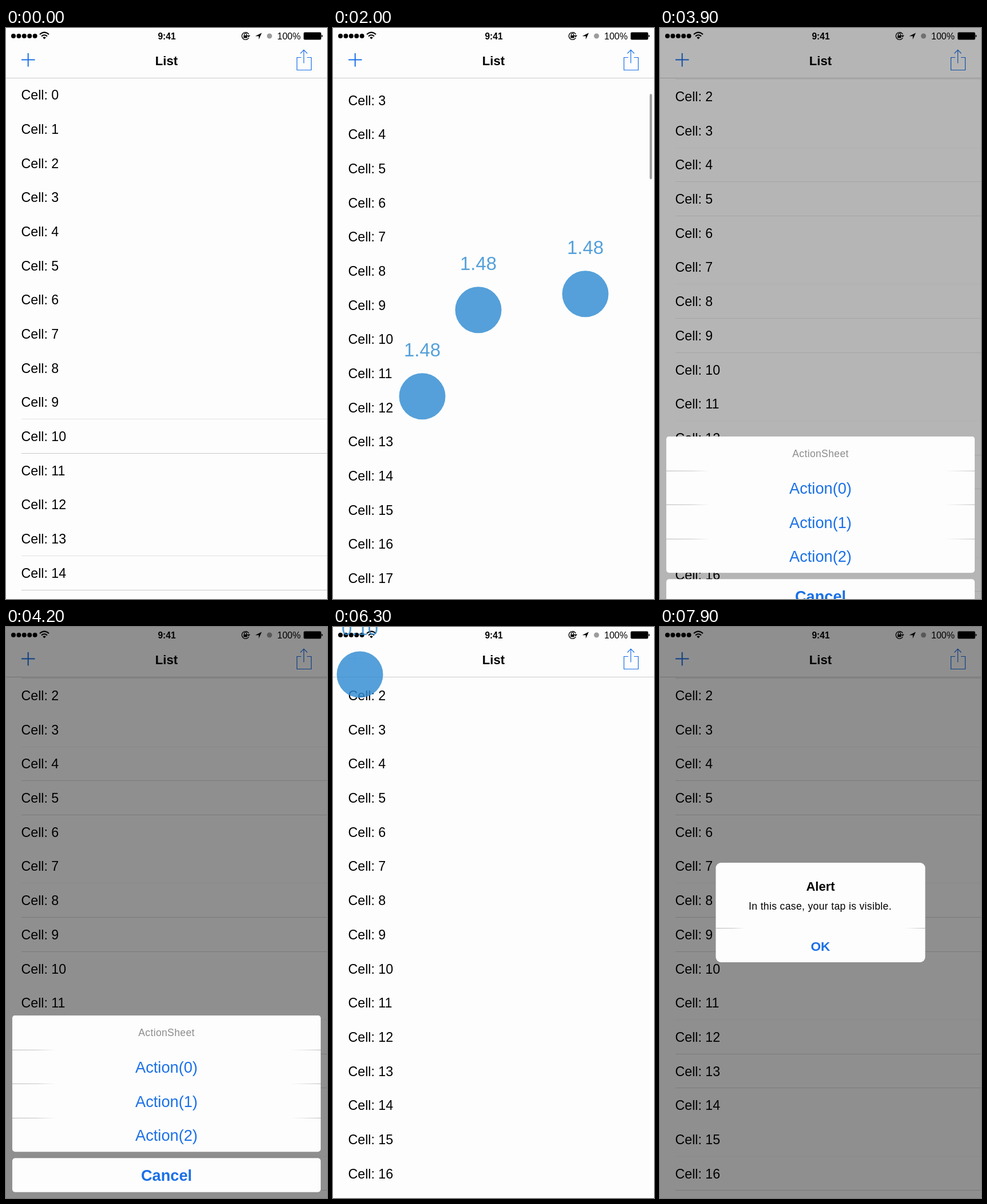
These frames come from a looping animation (561 by 998 pixels, 8 s). An HTML page:

```html
<!DOCTYPE html>
<html lang="en">
<head>
<meta charset="utf-8">
<title>List</title>
<style>
@property --y { syntax: "<number>"; inherits: true; initial-value: 0; }
@property --dim { syntax: "<number>"; inherits: true; initial-value: 0; }
html, body { margin: 0; width: 100%; height: 100%; overflow: hidden; background: #fdfdfd; }
svg {
  display: block; width: 561px; height: 998px;
  font-family: "Liberation Sans", Arial, sans-serif;
  animation: scroll 8s infinite, dim 8s infinite linear;
}
.bold { font-weight: bold; }
.mid { text-anchor: middle; }
.blue { fill: #1a70e8; }
.line { fill: none; stroke: #1a70e8; }
.row { font-size: 23.2px; }
.panel { fill: #fdfdfd; }
.crisp { shape-rendering: crispEdges; }
.action { font-size: 27.2px; }
.small { font-size: 17.6px; letter-spacing: .33px; }
.touch { fill: #308cd2; opacity: 0; font-size: 32.8px; text-anchor: middle; }
.scrolled { transform: translateY(calc(var(--y) * -1px)); }
#bar { transform: translateY(calc(var(--y) * .149px)); animation: bar 8s infinite linear; }
#shade { opacity: calc(var(--dim) * .435); }
#lines { opacity: var(--dim); }
#rest { animation: rest 8s infinite step-end; }
#sheet { animation: sheet 8s infinite; }
#alert { transform-origin: 280.5px 499px; animation: alert 8s infinite; }
#plus { animation: plus 8s infinite step-end; }
#share { animation: share 8s infinite step-end; }

@keyframes scroll {
  0%, 6.5% { --y: 0; animation-timing-function: cubic-bezier(.35, .1, .5, .9); }
  15% { --y: 255.5; animation-timing-function: ease-out; }
  18% { --y: 272; animation-timing-function: cubic-bezier(.45, 0, .6, .9); }
  28% { --y: 136; animation-timing-function: ease-out; }
  33%, 100% { --y: 116.5; }
}
@keyframes dim {
  0%, 45.6% { --dim: 0; }
  50.5%, 70.6% { --dim: 1; }
  75.5%, 80.5% { --dim: 0; }
  85%, 100% { --dim: 1; }
}
@keyframes bar {
  0%, 6.5% { opacity: 0; }
  7%, 33.5% { opacity: 1; }
  37%, 100% { opacity: 0; }
}
@keyframes rest {
  0% { opacity: 1; }
  6.25%, 100% { opacity: 0; }
}
@keyframes sheet {
  0%, 45.6% { transform: translateY(335px); animation-timing-function: cubic-bezier(.1, .8, .3, 1); }
  53.5%, 70.6% { transform: none; animation-timing-function: cubic-bezier(.4, .1, .5, 1); }
  75.6%, 100% { transform: translateY(335px); }
}
@keyframes alert {
  0%, 80.5% { opacity: 0; transform: scale(1.2); animation-timing-function: cubic-bezier(.15, .8, .3, 1); }
  86%, 100% { opacity: 1; transform: none; }
}
@keyframes plus {
  0% { opacity: 1; }
  77.5% { opacity: .1; }
  80.5%, 100% { opacity: 1; }
}
@keyframes share {
  0% { opacity: 1; }
  43.75% { opacity: .2; }
  45.6%, 100% { opacity: 1; }
}
</style>
</head>
<body>
<svg viewBox="0 0 561 998" xmlns="http://www.w3.org/2000/svg">
  <defs>
    <linearGradient id="ends">
      <stop offset="0" stop-color="#b4b4b4"/>
      <stop offset=".08" stop-color="#c4c4c4"/>
      <stop offset=".14" stop-color="#c4c4c4" stop-opacity="0"/>
      <stop offset=".9" stop-color="#c4c4c4" stop-opacity="0"/>
      <stop offset="1" stop-color="#b4b4b4"/>
    </linearGradient>
  </defs>
  <rect width="561" height="998" fill="#fdfdfd"/>

  <g class="scrolled">
    <g id="rest" class="crisp"></g>
    <g id="lines" class="crisp"></g>
    <g id="rows" class="row"></g>
  </g>
  <rect id="bar" x="553.5" y="90" width="4" height="149" rx="2" fill="#9a9a9a"/>

  <rect width="561" height="87" fill="#fdfdfd"/>
  <rect y="87" width="561" height="1" fill="#cbcbcb"/>
  <g id="dots"></g>
  <g fill="none" stroke="#000" stroke-width="2">
    <path d="M59 11.2Q67 4 75 11.2M62 14.4Q67 10 72 14.4"/>
    <path d="M67 19.6L64.2 16.7Q67 14.4 69.8 16.7Z" fill="#000" stroke="none"/>
    <path d="M424.3 11A6.4 6.4 0 1 0 424.3 17" stroke-width="1.4"/>
    <path d="M421 12.8h6l-3 3.4z" fill="#000" stroke="none"/>
    <path d="M416.4 13v-1.6a2 2 0 0 1 4 0V13" stroke-width="1.2"/>
    <path d="M415.2 13h6.4v4.6h-6.4zM447 8.6L441.8 20V14.2H435.6Z" fill="#000" stroke="none"/>
  </g>
  <circle cx="460.5" cy="14" r="4.5" fill="#9c9c9c"/>
  <text class="mid bold" x="281" y="19.7" font-size="15.6">9:41</text>
  <text x="474" y="19.7" font-size="16">100%</text>
  <rect x="520.2" y="7.4" width="30.6" height="13.1" rx="2"/>
  <path d="M551.5 11.8q2 .4 2 2.2t-2 2.2z"/>
  <text class="mid bold" x="280.5" y="65" font-size="22.2">List</text>
  <path id="plus" class="line" stroke-width="2" d="M27 55.5H50.5M38.7 44V67.5"/>
  <path id="share" class="line" stroke-width="1.2" d="M516 51.5H508.5V73.5H533.5V51.5H526M520.5 61.5V38.5M514.5 44.5L520.5 38.3L526.5 44.5"/>

  <rect id="shade" width="561" height="998"/>

  <g id="sheet">
    <rect class="panel" x="11" y="678" width="539" height="238.5" rx="5"/>
    <rect class="panel" x="11" y="927.5" width="539" height="59.5" rx="5"/>
    <g fill="url(#ends)">
      <rect x="11" y="738" width="539" height="1"/>
      <rect x="11" y="797" width="539" height="1"/>
      <rect x="11" y="857" width="539" height="1"/>
    </g>
    <text class="mid small" x="280.5" y="714.5" fill="#8c8c8c">ActionSheet</text>
    <g id="actions" class="mid blue action"></g>
    <text class="mid blue action bold" x="280.5" y="967">Cancel</text>
  </g>

  <g id="alert">
    <rect class="panel" x="97.5" y="412" width="366" height="174" rx="9"/>
    <rect x="97.5" y="526" width="366" height="1" fill="url(#ends)"/>
    <text class="mid bold" x="280.5" y="461" font-size="22">Alert</text>
    <text class="mid small" x="280" y="494">In this case, your tap is visible.</text>
    <text class="mid blue bold" x="280.5" y="566" font-size="22.6">OK</text>
  </g>

  <g id="fingers" class="scrolled"></g>
  <g id="taps"></g>
</svg>
<script>
const LOOP = 8000, STEP = 100, FADE = 200, PITCH = 59.68;
const $ = id => document.getElementById(id);

function add(parent, tag, attrs, text = "") {
  const el = document.createElementNS("http://www.w3.org/2000/svg", tag);
  for (const k in attrs) el.setAttribute(k, attrs[k]);
  el.textContent = text;
  return parent.appendChild(el);
}

function separator(group, row, color) {
  add(group, "rect", { x: 27, y: 146 + PITCH * row, width: 534, height: 1, fill: color });
}

for (let i = 0; i < 5; i++) add($("dots"), "circle", { cx: 13 + 9.4 * i, cy: 14, r: 4 });
for (let i = 0; i < 22; i++) {
  add($("rows"), "text", { x: 26.5, y: 125.2 + PITCH * i }, "Cell: " + i);
  if (i % 4 !== 2) separator($("lines"), i, i % 4 === 3 ? "#f3f3f4" : "#d8d8da");
}
for (const i of [9, 13]) separator($("rest"), i, "#e0e0e0");
for (const i of [10, 14]) separator($("rest"), i, "#c8c8ca");
for (let i = 0; i < 3; i++) add($("actions"), "text", { x: 280.5, y: 778.5 + 59.6 * i }, `Action(${i})`);

// Finger positions are relative to the unscrolled list.
function touch(group, from, to, x, y, x2 = x, y2 = y) {
  const g = add(group, "g", { class: "touch" });
  add(g, "circle", { r: 40.5 });
  return { g, label: add(g, "text", { y: -69.3 }), from, to, x, y, x2, y2 };
}

const touches = [
  touch($("fingers"), 520, 2250, 156, 813.5),
  touch($("fingers"), 520, 2250, 254, 662.5),
  touch($("fingers"), 520, 2250, 441, 634.5),
  touch($("taps"), 3480, 3630, 521, 58),
  touch($("taps"), 4400, 5360, 273, 722, 268.2, 806),
  touch($("taps"), 5460, 5630, 290, 957),
  touch($("taps"), 6200, 6420, 47, 83),
  touch($("taps"), 7100, 7680, 290, 500, 312, 590),
];

function draw(now) {
  const t = Math.floor((now % LOOP + 15) / STEP) * STEP % LOOP;
  for (const p of touches) {
    const held = Math.min(t, p.to) - p.from;
    const k = held / (p.to - p.from);
    const alpha = t < p.from ? 0 : Math.max(0, Math.min(1, 1 - (t - p.to) / FADE));
    p.g.style.opacity = alpha * .82;
    if (!alpha) continue;
    p.g.setAttribute("transform", `translate(${p.x + (p.x2 - p.x) * k} ${p.y + (p.y2 - p.y) * k})`);
    p.label.textContent = (held / 1000).toFixed(2);
  }
  requestAnimationFrame(draw);
}
requestAnimationFrame(draw);
</script>
</body>
</html>
```
